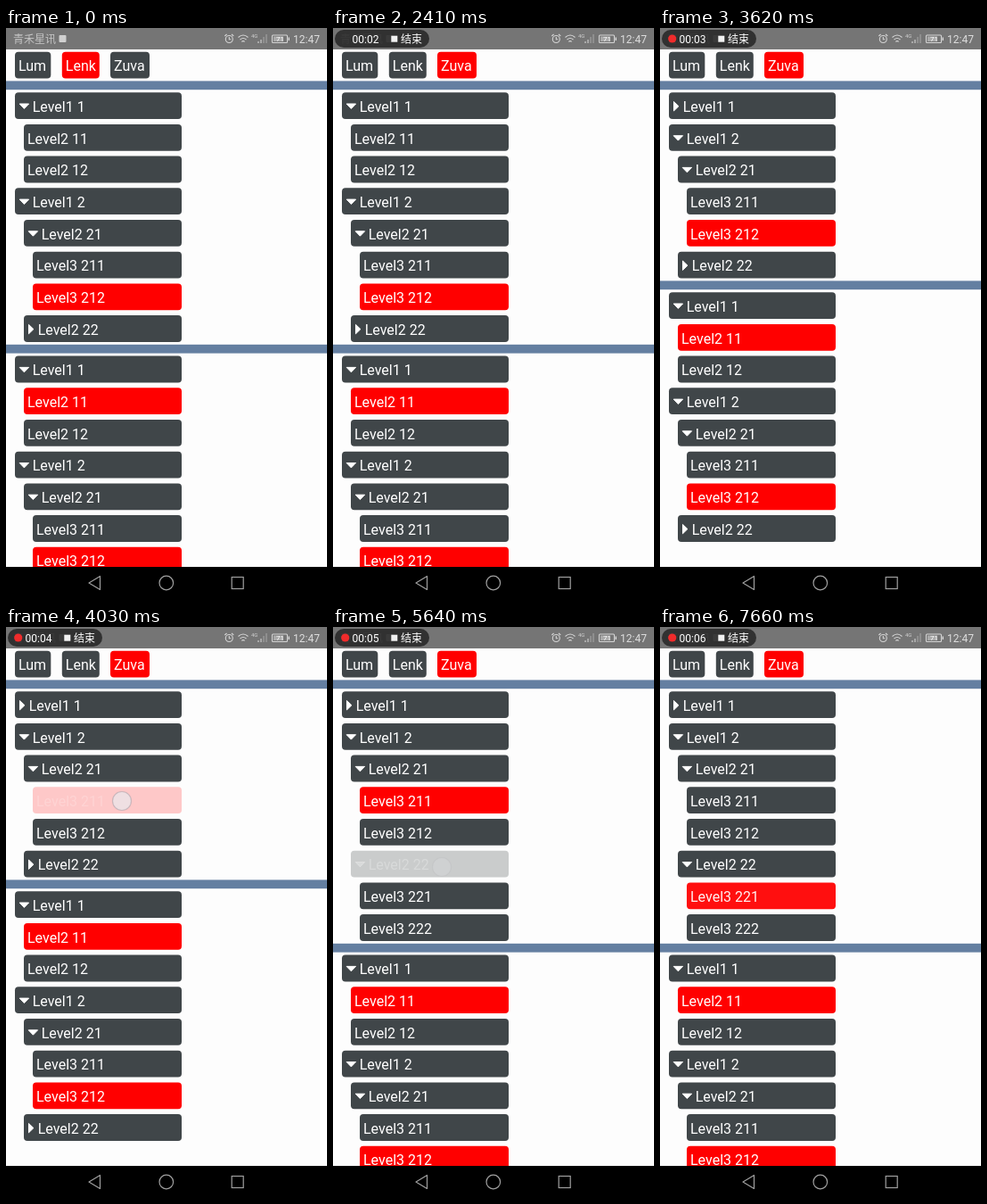
These frames come from a looping animation (360 px wide and 640 px high, 8000 ms). An HTML page:

```html
<!DOCTYPE html>
<html lang="en">
<head>
<meta charset="utf-8">
<style>
html, body { margin: 0; width: 100%; height: 100%; overflow: hidden; background: #fdfdfd; }
svg { display: block; width: 360px; height: 640px; font: 16px Roboto, sans-serif; }
</style>
</head>
<body>
<svg id="stage" viewBox="0 0 360 640"></svg>
<script>
const LOOP = 8000, PITCH = 35.7;
const DARK = '#404649', RED = '#ff0000', BAR = '#647fa1';
const stage = document.getElementById('stage');

// label: [depth, parents, is folder]
const TREE = {
  'Level1 1': [0, [], true],
  'Level2 11': [1, ['Level1 1']],
  'Level2 12': [1, ['Level1 1']],
  'Level1 2': [0, [], true],
  'Level2 21': [1, ['Level1 2'], true],
  'Level3 211': [2, ['Level1 2', 'Level2 21']],
  'Level3 212': [2, ['Level1 2', 'Level2 21']],
  'Level2 22': [1, ['Level1 2'], true],
  'Level3 221': [2, ['Level1 2', 'Level2 22']],
  'Level3 222': [2, ['Level1 2', 'Level2 22']]
};
const TABS = [['Lum', 10, 40.3], ['Lenk', 62.8, 42], ['Zuva', 117, 44]];
const LOWER = { closed: ['Level2 22'], picked: ['Level2 11', 'Level3 212'] };

// Each step changes part of the state from its time on.
const STEPS = [
  [0, { tab: 'Lenk', closed: ['Level2 22'], picked: ['Level3 212'], dim: {}, touch: null, clock: -1, dot: true }],
  [400, { clock: 0 }],
  [800, { dot: false }],
  [1200, { tab: 'Zuva', dim: { Zuva: .76 }, dot: true }],
  [1610, { dim: {}, clock: 1, dot: false }],
  [2010, { dot: true }],
  [2410, { clock: 2, dot: false }],
  [2820, { closed: ['Level1 1', 'Level2 22'], dim: { 'Level1 1': .32 }, dot: true }],
  [3220, { dim: {}, clock: 3, dot: false }],
  [3620, { dot: true }],
  [4030, { picked: ['Level3 211'], dim: { 'Level3 211': .21 }, touch: [130, 195, 1], clock: 4 }],
  [4430, { dim: {}, touch: null, dot: false }],
  [4830, { dot: true }],
  [5240, { clock: 5 }],
  [5640, { closed: ['Level1 1'], dim: { 'Level2 22': .27 }, touch: [122, 269, .25] }],
  [6040, { dim: {}, touch: null }],
  [6450, { clock: 6, dot: false }],
  [6850, { dim: { 'Level3 221': .2 }, touch: [146, 306, 1] }],
  [7660, { picked: ['Level3 221'], dim: { 'Level3 221': .94 }, touch: null, dot: true }]
];

const rect = (x, y, w, h, fill, r = 0) =>
  `<rect x="${x}" y="${y}" width="${w}" height="${h}" rx="${r}" fill="${fill}"/>`;
const text = (x, y, s, attrs = 'fill="#fff"') => `<text x="${x}" y="${y}" ${attrs}>${s}</text>`;
const path = (d, attrs) => `<path d="${d}" ${attrs}/>`;
const fade = (a = 1, body) => `<g fill-opacity="${a}" stroke-opacity="${a}">${body}</g>`;

function caret(x, y, open) {
  const d = open ? `M${x + 5.2} ${y - 2.7}h10.4l-5.2 5.4z` : `M${x + 5.5} ${y - 5.2}v10.4l5.4-5.2z`;
  return path(d, 'fill="#fff" stroke="#fff" stroke-linejoin="round"');
}

function list(top, { closed, picked, dim = {} }) {
  let y = top, out = '';
  for (const [name, [depth, parents, folder]] of Object.entries(TREE)) {
    if (parents.some(p => closed.includes(p))) continue;
    const x = 10 + depth * 10, open = !closed.includes(name);
    const indent = !folder ? 4 : open ? 19.7 : 15.7;
    out += fade(dim[name],
      rect(x, y + 3, 197 - x, 29.8, picked.includes(name) ? RED : DARK, 4) +
      (folder ? caret(x, y + 18.5, open) : '') +
      text(x + indent, y + 24.6, name));
    y += PITCH;
  }
  return [out, y];
}

function statusBar({ clock, dot }) {
  const cjk = 'font-family="Noto Sans CJK SC, Noto Sans CJK, sans-serif" font-size="12"';
  let out = rect(0, 0, 360, 24, '#757575') +
    text(8, 16.5, '青禾星讯', `${cjk} fill="#c4c4c4"`) + rect(59.5, 8, 8, 8, '#d0d0d0', 1);
  if (clock >= 0) {
    out += rect(2, 2, 106, 20, 'rgba(43,43,43,.9)', 10) +
      (dot ? '<circle cx="13.7" cy="12" r="4.6" fill="#f02b2b"/>' : '') +
      text(21.5, 16.5, '00:0' + clock, 'font-size="12" fill="#fff"') +
      rect(65.3, 8.7, 7, 7, '#f2f2f2') + text(76, 16.5, '结束', `${cjk} fill="#fff"`);
  }
  const line = 'fill="none" stroke="#d4d4d4" stroke-width="1.1"';
  return out +
    `<circle cx="250.3" cy="12.5" r="4" ${line}/>` +
    path('M250.3 10v2.8h2M245.3 9l2.3-2M255.3 9l-2.3-2', line) +
    path('M260.5 10.5q5.5-5 11 0M262.5 13q3.5-3 7 0M264.3 15.3q1.7-1.4 3.4 0', line) +
    text(275, 11, '4G', 'font-size="6" fill="#d4d4d4"') +
    path('M283 17v-2M286 17v-4', line) + path('M289 17v-7M292 17v-10', 'stroke="#a4a4a4" stroke-width="1.1"') +
    `<rect x="298.5" y="8" width="17" height="8.5" rx="1" ${line}/>` +
    rect(300, 9.5, 11, 5.5, '#aaa') + rect(316.5, 10.5, 1.5, 3.5, '#d4d4d4') +
    text(303, 15.2, '71', 'font-size="8" fill="#fff"') +
    text(322, 16.5, '12:47', 'font-size="12" fill="#dedede"');
}

function navBar() {
  const line = 'fill="none" stroke="#a0a0a0" stroke-width="1.2"';
  return rect(0, 604, 360, 36, '#000') +
    path('M93 622L105.5 614.5V629.5Z', line + ' stroke-linejoin="round"') +
    `<circle cx="179.8" cy="622" r="7.8" ${line}/>` +
    `<rect x="253.2" y="615.5" width="13" height="13" ${line}/>`;
}

function draw(s) {
  const [upper, end] = list(69.2, s);
  const [lower] = list(end + 9.8, LOWER);
  const tabs = TABS.map(([name, x, w]) => fade(s.dim[name],
    rect(x, 26.7, w, 29.8, name === s.tab ? RED : DARK, 4) + text(x + 4, 48, name))).join('');
  const touch = s.touch ? `<circle cx="${s.touch[0]}" cy="${s.touch[1]}" r="10.5" opacity="${s.touch[2]}"
    fill="rgba(232,232,236,.7)" stroke="rgba(150,150,160,.45)" stroke-width="1.2"/>` : '';
  stage.innerHTML = rect(0, 0, 360, 640, '#fdfdfd') + tabs +
    rect(0, 59.4, 360, 9.8, BAR) + upper + rect(0, end, 360, 9.8, BAR) + lower +
    touch + statusBar(s) + navBar();
}

let shown = -1;
function tick() {
  const t = performance.now() % LOOP;
  const past = STEPS.filter(([at]) => at <= t);
  if (past.length !== shown) {
    shown = past.length;
    draw(Object.assign({}, ...past.map(([, change]) => change)));
  }
  requestAnimationFrame(tick);
}
tick();
</script>
</body>
</html>
```
